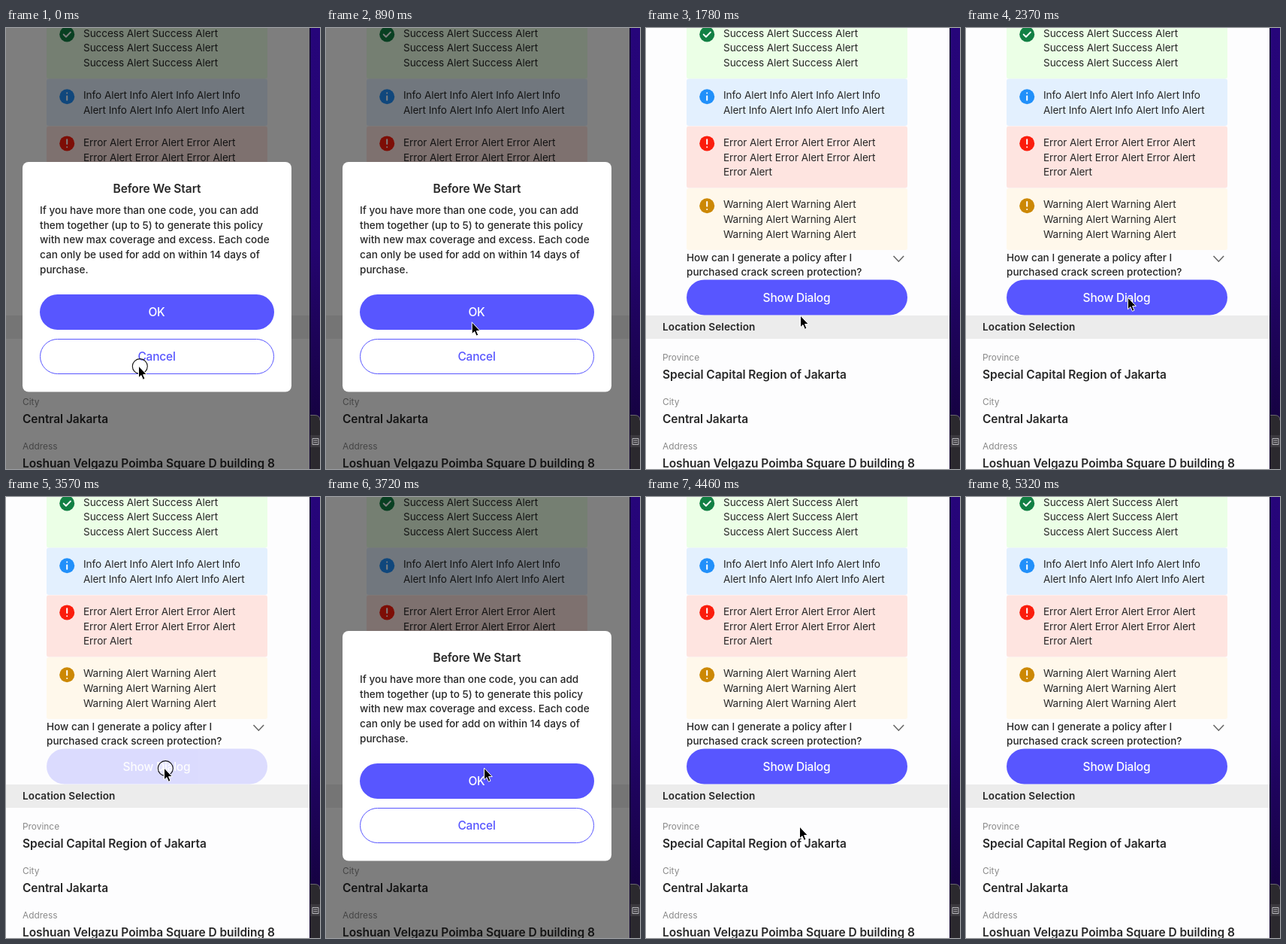
An HTML page for the animation above (5420 ms loop, 418 by 586 pixels).

```html
<!DOCTYPE html>
<html lang="en">
<head>
<meta charset="utf-8">
<title>Dialog demo</title>
<style>
  html, body { margin: 0; height: 100%; overflow: hidden; background: #fdfdfe; }
  svg { display: block; width: 100vw; height: 100vh; }
  text { font-family: Inter, "Open Sans", sans-serif; fill: #272727; white-space: pre; }
  .body { font-size: 13.6px; letter-spacing: -.006em; }
  .medium { font-weight: 500; letter-spacing: -.001em; }
  .head { font-size: 13.6px; font-weight: 600; letter-spacing: .008em; }
  .label { font-size: 11.9px; fill: #8a8a8a; }
  .value { font-size: 15.5px; font-weight: 600; letter-spacing: -.004em; }
  .button { font-size: 15.5px; font-weight: 500; letter-spacing: -.014em; }
  .middle { text-anchor: middle; }
  .light { fill: #fff; }
  .accent { fill: #5856ff; }
</style>
</head>
<body>
<svg viewBox="0 0 418 586">
  <defs>
    <linearGradient id="desktop" x2="0" y2="1">
      <stop stop-color="#26057a"/>
      <stop offset=".5" stop-color="#24046f"/>
      <stop offset=".9" stop-color="#150240"/>
    </linearGradient>
  </defs>
  <g id="page"></g>

  <g id="dialog">
    <path d="M0 0H404V586H0Z" opacity=".5"/>
    <rect x="22" y="178" width="358" height="305.5" rx="8" fill="#fff"/>
  </g>

  <g id="side">
    <rect x="404" width="14" height="586" fill="url(#desktop)"/>
    <path d="M404 0h1.5v586h-1.5z" fill="#120630"/>
    <path d="M405 514.5h6q7 0 7 7V586h-13z" fill="#2b292e"/>
    <path d="M405 514.5h6q7 0 7 7" fill="none" stroke="#69666f"/>
    <path d="M405 541h13v16h-13z" fill="#3b393e"/>
    <path d="M408 545.5h8v8h-8zM409.5 548h5M409.5 550.8h5" fill="none" stroke="#b9b8bc"/>
  </g>

  <g id="cursor">
    <circle id="touch" cx="2.3" cy=".6" r="10" fill="#fff" fill-opacity=".35" stroke="#111" stroke-width="1.1"/>
    <path d="M.5 0V15.8L4 12.6 6.4 18.3 9 17.2 6.6 11.6H11.3Z" stroke="#fff" stroke-width="1" stroke-linejoin="round"/>
  </g>
</svg>
<script>
const LOOP = 5420, TICK = 148.7, LINE = 19.6;
const $ = id => document.getElementById(id);
const page = $('page'), dialog = $('dialog');

function add(parent, tag, attrs, content = '') {
  const node = document.createElementNS('http://www.w3.org/2000/svg', tag);
  for (const key in attrs) node.setAttribute(key, attrs[key]);
  node.textContent = content;
  return parent.appendChild(node);
}

function write(parent, style, x, y, ...lines) {
  lines.forEach((line, i) => add(parent, 'text', { class: style, x, y: y + i * LINE }, line));
}

function button(parent, x, y, width, height, label, outlined) {
  const group = add(parent, 'g', {});
  const inset = outlined ? .5 : 0;
  add(group, 'rect', {
    x: x + inset, y: y + inset, width: width - 2 * inset, height: height - 2 * inset, rx: height / 2 - inset,
    fill: outlined ? '#fff' : '#5856ff', stroke: outlined ? '#5856ff' : 'none'
  });
  write(group, 'button middle ' + (outlined ? 'accent' : 'light'), x + width / 2 - .5, y + height / 2 + 5.6, label);
  return group;
}

// Icon strokes, drawn around the centre of the disc
const icons = {
  check: 'M-4.5 .2l3.2 3.2 6-6.2',
  info: 'M0 -4.6v0M0 -.8v5.4',
  bang: 'M0 -5.2v5.8M0 4.8v0'
};

function alertBox(top, bottom, fill, icon, iconY, iconFill, baseline, ...lines) {
  add(page, 'rect', { x: 54, y: top, width: 294, height: bottom - top, rx: 3, fill });
  add(page, 'circle', { cx: 81.2, cy: iconY, r: 10, fill: iconFill });
  add(page, 'path', {
    d: icons[icon], transform: `translate(81.2 ${iconY})`,
    fill: 'none', stroke: '#fff', 'stroke-width': 2, 'stroke-linecap': 'round', 'stroke-linejoin': 'round'
  });
  write(page, 'body', 103, baseline, ...lines);
}

const repeat = (phrase, count) => Array(count).fill(phrase).join(' ');
const success = repeat('Success Alert', 2);
const error = repeat('Error Alert', 3);
const warning = repeat('Warning Alert', 2);

add(page, 'rect', { width: 404, height: 586, fill: '#fdfdfe' });
alertBox(-15, 67.5, '#ebffe6', 'check', 8.4, '#128044', 11.8, success, success, success);
alertBox(67.5, 130, '#e3f0fe', 'info', 91.2, '#2190fa', 94.4,
  repeat('Info Alert', 3) + ' Info', 'Alert ' + repeat('Info Alert', 3));
alertBox(130.5, 212.5, '#fee4e0', 'bang', 153.4, '#fb1d0c', 157, error, error, 'Error Alert');
alertBox(213, 295, '#fff8eb', 'bang', 236.2, '#cc8804', 239.4, warning, warning, warning);

write(page, 'body medium', 54, 309.8, 'How can I generate a policy after I', 'purchased crack screen protection?');
add(page, 'path', { d: 'M329.5 303l6.8 7.2 6.8-7.2', fill: 'none', stroke: '#666', 'stroke-width': 1.6 });
add(page, 'rect', { y: 382, width: 404, height: 31, fill: '#ececec' });
write(page, 'head', 22, 402.3, 'Location Selection');
[['Province', 'Special Capital Region of Jakarta'],
 ['City', 'Central Jakarta'],
 ['Address', 'Loshuan Velgazu Poimba Square D building 8']
].forEach(([label, value], i) => {
  write(page, 'label', 22, 442 + i * 59, label);
  write(page, 'value', 22, 466 + i * 59, value);
});

write(dialog, 'value middle', 201, 218.7, 'Before We Start');
write(dialog, 'body medium', 45, 247.2,
  'If you have more than one code, you can add',
  'them together (up to 5) to generate this policy',
  'with new max coverage and excess. Each code',
  'can only be used for add on within 14 days of',
  'purchase.');

// Each button fades during the tick in which it is pressed.
const presses = [
  [11, button(dialog, 45, 354, 312, 47, 'OK')],
  [24, button(page, 54, 334.5, 294, 47, 'Show Dialog')],
  [29, button(dialog, 45, 413, 312, 47, 'Cancel', true)]
];

// Cursor stops: tick, x, y
const stops = [
  [0, 176, 449], [8, 197, 380], [11, 205, 382], [13, 205, 382], [16, 215, 358], [21, 215, 358],
  [22, 210, 360], [25, 210, 360], [28, 204, 438], [30, 204, 438], [31, 262, 507], [33, 348, 579], [34, 360, 610], [40, 360, 610]
];

function cursorAt(tick) {
  const i = stops.findIndex(stop => stop[0] > tick);
  const [from, x0, y0] = stops[i - 1], [to, x1, y1] = stops[i];
  const p = (tick - from) / (to - from), e = p * p * (3 - 2 * p);
  return [x0 + (x1 - x0) * e, y0 + (y1 - y0) * e];
}

function draw(now) {
  const tick = Math.floor((now % LOOP + 10) / TICK);
  const open = tick < 12 || (tick >= 25 && tick < 30);
  dialog.setAttribute('visibility', open ? 'visible' : 'hidden');
  presses.forEach(([at, node]) => node.setAttribute('opacity', tick === at ? .2 : 1));
  const touching = tick === 0 || presses.some(([at]) => at === tick);
  $('touch').setAttribute('visibility', touching ? 'visible' : 'hidden');
  $('cursor').setAttribute('transform', `translate(${cursorAt(tick)})`);
  requestAnimationFrame(() => draw(performance.now()));
}
draw(0);
</script>
</body>
</html>
```
